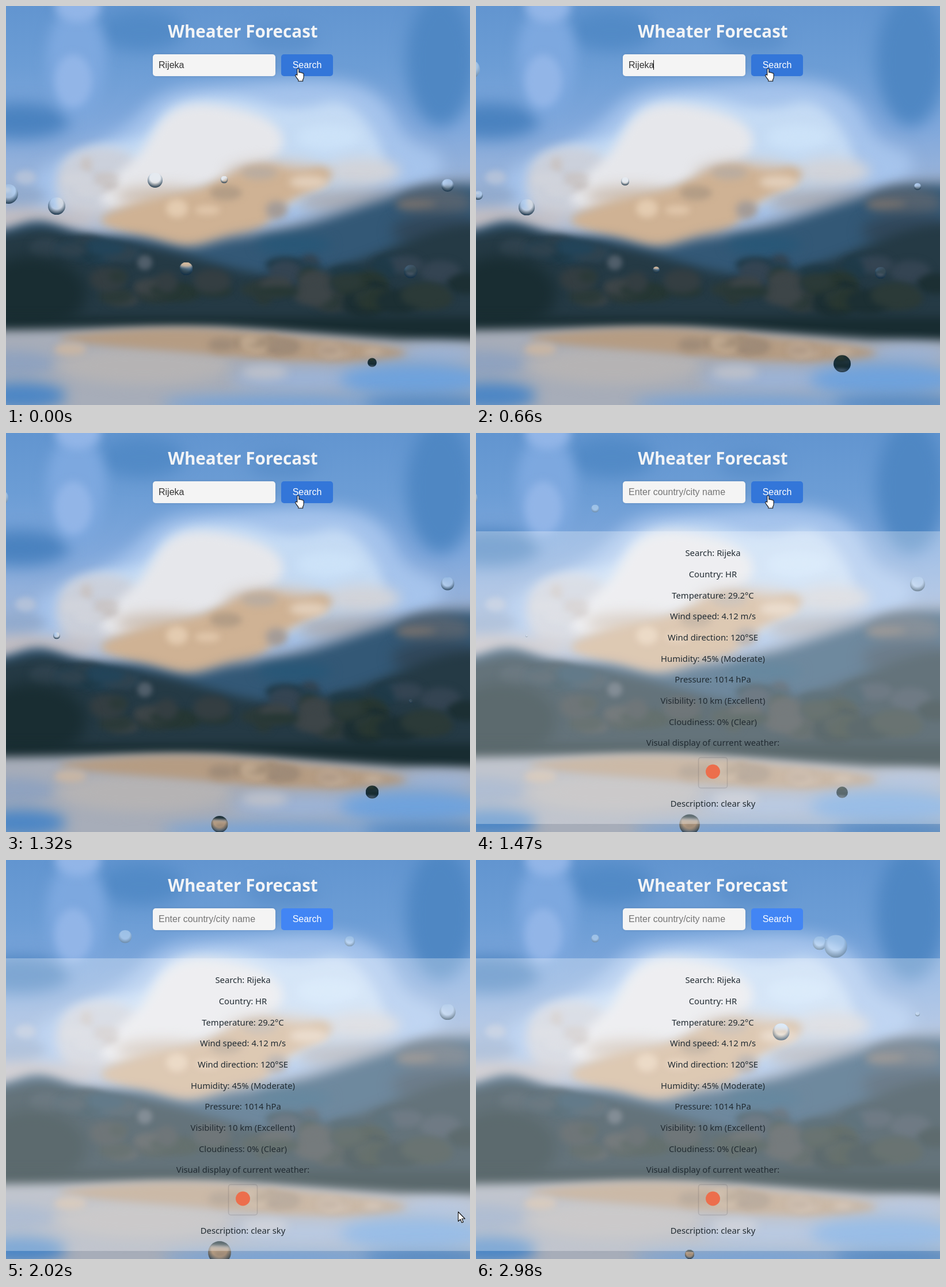
Animation of 806x694 px, one loop 3000 ms. Source, as an HTML page with a canvas:

```html
<!DOCTYPE html>
<html lang="en">
<head>
<meta charset="utf-8">
<title>Forecast</title>
<style>
  html, body { margin: 0; width: 100%; height: 100%; overflow: hidden; background: #6b9cd4; }
  canvas { display: block; width: 100vw; height: 100vh; }
</style>
</head>
<body>
<canvas id="stage" width="806" height="694"></canvas>
<script>
const W = 806, H = 694, LOOP = 3000;
const TICK = LOOP / 22, TICK_SHIFT = 44;
const RESULT_AT = 1470, LEAVE_AT = 1720, GONE_AT = 2170;
const SANS = '"Noto Sans", "Open Sans", sans-serif';
const FORM = '"Liberation Sans", Arial, sans-serif';
const ctx = document.getElementById('stage').getContext('2d');

const clamp = (v, lo, hi) => Math.min(hi, Math.max(lo, v));
const bump = (x, center, width) => Math.exp(-(((x - center) / width) ** 2));
const smooth = (x, from, to) => {
  const k = clamp((x - from) / (to - from), 0, 1);
  return k * k * (3 - 2 * k);
};

// ---------- blurred landscape, painted once ----------
const scene = document.createElement('canvas');
scene.width = W;
scene.height = H;
const bg = scene.getContext('2d');

function brush(color, blur) {
  bg.filter = `blur(${blur}px)`;
  bg.fillStyle = color;
  bg.beginPath();
}

function spot(color, blur, x, y, rx, ry) {
  brush(color, blur);
  bg.ellipse(x, y, rx, ry, 0, 0, 7);
  bg.fill();
}

// Smooth closed shape through the midpoints of its corners.
function blob(color, blur, ...pts) {
  const n = pts.length;
  brush(color, blur);
  for (let i = 0; i <= n; i++) {
    const [ax, ay] = pts[i % n], [bx, by] = pts[(i + 1) % n];
    bg.quadraticCurveTo(ax, ay, (ax + bx) / 2, (ay + by) / 2);
    if (i === 0) {
      bg.beginPath();
      bg.moveTo((ax + bx) / 2, (ay + by) / 2);
    }
  }
  bg.fill();
}

// Everything below a ridge line y = ridge(x).
function ground(color, blur, ridge) {
  brush(color, blur);
  bg.moveTo(-60, H + 60);
  for (let x = -60; x <= W + 60; x += 10) bg.lineTo(x, ridge(x));
  bg.lineTo(W + 60, H + 60);
  bg.fill();
}

let seed = 7;
function random(lo, hi) {
  seed = (seed * 16807) % 2147483647;
  return lo + (hi - lo) * seed / 2147483647;
}

// Soft seeded patches inside a box.
function mottle(colors, count, left, top, right, bottom, size) {
  for (let i = 0; i < count; i++) {
    const rx = random(.6, 1.6) * size, ry = random(.4, .9) * size;
    spot(colors[i % colors.length], 6, random(left, right), random(top, bottom), rx, ry);
  }
}

const farRidge = x => 396 - 25 * bump(x, 55, 55) + 20 * bump(x, 315, 60) - 90 * smooth(x, 400, 800);
const nearRidge = x => 403 - 18 * bump(x, 60, 60) + 65 * bump(x, 480, 190) - 25 * smooth(x, 600, 800);
const shore = x => 564 - 6 * bump(x, 300, 200) + 18 * smooth(x, 350, 800);

function paintSky() {
  const g = bg.createLinearGradient(0, 0, 0, 420);
  ['#6295d0', '#6c9dd5', '#80a8dc', '#9db5d9', '#b8b9c4'].forEach((c, i) => g.addColorStop(i / 4, c));
  bg.fillStyle = g;
  bg.fillRect(0, 0, W, H);

  spot('#4a82bf', 14, 25, 200, 85, 32);
  spot('#4f87c3', 14, 755, 95, 60, 115);
  spot('#528ac6', 14, 235, 42, 75, 36);
  spot('#5c90cb', 12, 480, 55, 60, 25);
  spot('#7da8df', 11, 122, 95, 52, 95);
  spot('#92b5e7', 7, 117, 130, 32, 46);
  spot('#92b5e7', 8, 125, 0, 40, 28);

  blob('#a6c4ec', 14, [30, 290], [200, 225], [270, 145], [390, 135], [590, 125], [665, 165],
    [690, 235], [770, 260], [740, 320], [600, 390], [60, 395]);
  spot('#92abce', 10, 20, 330, 50, 20);
  spot('#b2c1d9', 5, 34, 298, 18, 12);
  blob('#c5dbf4', 10, [285, 165], [400, 155], [500, 185], [600, 155], [680, 290], [560, 350],
    [200, 350], [95, 300], [140, 245], [240, 235]);
  blob('#cbd0db', 9, [100, 255], [180, 240], [240, 270], [230, 350], [120, 380], [80, 320]);
  blob('#e6e7eb', 9, [275, 185], [340, 165], [470, 195], [490, 260], [360, 310], [190, 365],
    [150, 325], [235, 260]);
  spot('#cce2f8', 9, 560, 228, 55, 22);
  spot('#d1d3d9', 11, 620, 288, 65, 24);
  spot('#c6bfc0', 13, 60, 372, 110, 18);
  spot('#aaaeb8', 13, 600, 340, 95, 24);
  mottle(['#c9c4c4', '#d0d3db'], 6, 115, 260, 200, 340, 17);
}

function paintMountain() {
  spot('#d0c6bf', 11, 470, 292, 90, 25);
  spot('#cfc3b9', 11, 270, 330, 80, 18);
  blob('#cfb294', 8, [140, 372], [240, 335], [320, 325], [380, 295], [450, 272], [510, 290],
    [555, 275], [575, 300], [480, 345], [445, 395], [315, 440], [230, 405]);
  spot('#e3cbb0', 6, 297, 352, 19, 16);
  spot('#e0c6aa', 6, 350, 355, 22, 8);
  spot('#e2cfbb', 7, 525, 306, 33, 11);
  spot('#b39d86', 6, 382, 325, 28, 13);
  spot('#b9aca0', 7, 440, 290, 32, 11);
  spot('#a39b97', 7, 470, 355, 19, 16);
}

function paintHills() {
  ground('rgba(126,143,165,.7)', 9, x => farRidge(x) - 9 * smooth(x, 320, 480));
  ground('#335876', 9, x => farRidge(x) + 6);
  spot('#566370', 10, 745, 342, 65, 26);
  spot('#77726f', 7, 712, 345, 35, 7);
  spot('#31475a', 12, 755, 392, 85, 30);
  spot('#285777', 10, 500, 415, 65, 16);

  ground('#253a45', 9, nearRidge);
  mottle(['#234459', '#30434f', '#1f3a48'], 14, 60, 415, 220, 440, 22);
  mottle(['#234459', '#344452', '#1f3a48'], 12, 480, 445, 790, 465, 24);
  mottle(['#343e42', '#2b3a39', '#3d4548', '#263734'], 22, 160, 470, 570, 515, 24);
  mottle(['#283731', '#1c2f33', '#2b3a38'], 12, 590, 480, 800, 520, 28);
  spot('#192d32', 13, 45, 500, 95, 65);
  spot('#505e6a', 4, 241, 446, 13, 13);
  ground('#182c31', 8, x => 541);
}

function paintLake() {
  ground('#a7adb9', 8, shore);
  spot('#8fa2bf', 10, 15, 622, 70, 22);
  spot('#b5b3b4', 11, 240, 625, 150, 34);
  blob('#b59c83', 7, [60, 575], [300, 556], [480, 572], [650, 588], [715, 605], [640, 622],
    [470, 618], [330, 603], [150, 590]);
  mottle(['#a28d77', '#bfa88f', '#9f8b78'], 12, 310, 578, 500, 595, 15);
  mottle(['#c7b39f', '#b09a86'], 5, 540, 598, 660, 604, 13);
  spot('#c7b5a4', 6, 112, 597, 28, 11);
  spot('#9bb3d7', 12, 755, 605, 65, 14);
  spot('#9bb3d7', 12, 520, 650, 130, 18);
  spot('#6fa2dc', 13, 710, 650, 130, 30);
  spot('#74a2d8', 12, 480, 692, 210, 15);
  spot('#bcc0ca', 8, 450, 637, 40, 12);
  spot('#4c86c5', 12, 25, 678, 80, 24);
  spot('#4c86c5', 12, 740, 692, 120, 14);
}

paintSky();
paintMountain();
paintHills();
paintLake();

// ---------- drops: x, y at loop start, full radius, birth ----------
const LIFE = 2000, FADE = 1000, GROW = 150, FALL = 0.0034;
const DROPS = [
  [379, 302, 13, -1750], [4, 327, 18.8, -1180], [313, 457, 12.4, -1140], [259, 303, 13.5, -1070],
  [767, 312, 11.3, -1060], [703, 462, 12, -610], [88, 348, 15.5, -530], [636, 620, 15, -110],
  [-10, 108, 17, 0], [767, 257.5, 14, 1050], [371, 676, 20, 1125], [207, 126.5, 11.5, 1320],
  [597, 134.5, 13, 1820], [625, 140, 20, 2232], [530, 289, 15, 2355]
];

function dropAt([x, y, size, birth], t) {
  const age = t - birth;
  const grow = Math.max(0, 1 - Math.exp(-age / GROW));
  const fade = Math.sqrt(clamp((LIFE - age) / FADE, 0, 1));
  return { x, y: y + t * FALL, r: size * grow * fade };
}

function drawDrop({ x, y, r }) {
  if (r < 0.8) return;
  ctx.save();
  ctx.beginPath();
  ctx.arc(x, y, r, 0, 7);
  ctx.clip();
  // The lens squeezes a wider patch of landscape, shifted up towards the bottom of the stage.
  const span = 84;
  const sx = clamp(x - span / 2, 0, W - span);
  const sy = clamp(y - 75 * (y / 620) ** 3 - span / 2, 0, H - span);
  ctx.drawImage(scene, sx, sy, span, span, x - r, y - r, 2 * r, 2 * r);
  ctx.fillStyle = `rgba(225,243,255,${clamp(.55 - y / 1000, 0, .45)})`;
  ctx.fillRect(x - r, y - r, 2 * r, 2 * r);
  const rim = ctx.createRadialGradient(x, y - r * .35, r * .7, x, y - r * .35, r * 1.35);
  rim.addColorStop(0, 'rgba(12,42,66,0)');
  rim.addColorStop(1, `rgba(12,42,66,${clamp(y / 350, .4, .9)})`);
  ctx.fillStyle = rim;
  ctx.fillRect(x - r, y - r, 2 * r, 2 * r);
  ctx.restore();
}

// Liquid neck between two touching drops.
function drawNeck(a, b) {
  if (a.r < 3 || b.r < 3) return;
  const mx = a.x + a.r * .85, my = (a.y + b.y) / 2, h = a.r * .4;
  ctx.fillStyle = '#9cc8f0';
  ctx.beginPath();
  ctx.moveTo(a.x + 3, a.y - a.r * .95);
  ctx.quadraticCurveTo(mx, my - h, b.x - 3, b.y - b.r * .95);
  ctx.lineTo(b.x - 3, b.y + b.r * .95);
  ctx.quadraticCurveTo(mx, my + h, a.x + 3, a.y + a.r * .95);
  ctx.fill();
}

function drawDrops(t) {
  const drops = DROPS.map(d => dropAt(d, t));
  const [left, right] = drops.slice(-3);
  drawNeck(left, right);
  drops.forEach(drawDrop);
}

// ---------- interface ----------
function text(str, x, y, font, color, align = 'left') {
  ctx.font = font;
  ctx.fillStyle = color;
  ctx.textAlign = align;
  ctx.fillText(str, x, y);
}

function box(x, y, w, h, color, shadow = 0) {
  ctx.save();
  ctx.shadowColor = 'rgba(0,0,0,.1)';
  ctx.shadowBlur = shadow;
  ctx.fillStyle = color;
  ctx.beginPath();
  ctx.roundRect(x, y, w, h, 5);
  ctx.fill();
  ctx.restore();
}

const LINES = ['Search: Rijeka', 'Country: HR', 'Temperature: 29.2°C', 'Wind speed: 4.12 m/s',
  'Wind direction: 120°SE', 'Humidity: 45% (Moderate)', 'Pressure: 1014 hPa',
  'Visibility: 10 km (Excellent)', 'Cloudiness: 0% (Clear)', 'Visual display of current weather:'];

function drawResult() {
  const line = (str, y) => text(str, 411.5, y, '14.8px ' + SANS, '#212b32', 'center');
  ctx.fillStyle = 'rgba(255,255,255,.29)';
  ctx.fillRect(0, 171, W, 509);
  LINES.forEach((str, i) => line(str, 214.3 + i * 36.65));
  line('Description: clear sky', 650.3);

  ctx.strokeStyle = 'rgba(30,30,40,.13)';
  ctx.lineWidth = 1.5;
  ctx.beginPath();
  ctx.roundRect(386.5, 564.5, 50, 53, 4);
  ctx.stroke();
  ctx.fillStyle = '#ec6e4c';
  ctx.beginPath();
  ctx.arc(411.5, 589, 12.5, 0, 7);
  ctx.fill();
}

function drawForm(t) {
  const font = '16px ' + FORM;
  text('Wheater Forecast', 411.5, 55, 'bold 29.6px ' + SANS, '#f3f4f6', 'center');
  box(255, 84, 213, 38, '#f4f4f4', 5);
  box(478, 84, 90, 38, t < LEAVE_AT ? '#3376d9' : '#4285f4');
  if (t < RESULT_AT) text('Rijeka', 265, 108, font, '#333');
  else text('Enter country/city name', 265, 108, font, '#757575');
  text('Search', 523, 108, font, '#fff', 'center');
  if (t >= 510 && t < 1050) {
    ctx.fillStyle = '#111';
    ctx.fillRect(308, 94, 1, 17);
  }
}

const ARROW = new Path2D('M0 0V16.5L3.8 13L6.3 18.8L8.9 17.7L6.4 12H11.7Z');
const HAND = new Path2D('M3.5 12.5V2.5Q3.5 .7 5 .7Q6.6 .7 6.6 2.5V7.5Q8.2 6.4 9.4 8Q11 7.2 12 8.8' +
  'Q14.8 8.2 14.8 11V16Q14.8 18.5 13.3 20V22.7H5.5V20.5Q3 18 .8 14Q-.2 12 1.3 11.5Q2.5 11.3 3.5 12.5Z');

function drawCursor(t) {
  if (t >= GONE_AT) return;
  const shape = t < LEAVE_AT ? HAND : ARROW;
  const k = clamp((t - LEAVE_AT) / 300, 0, 1);
  ctx.save();
  ctx.translate(502.3 + 283.2 * k, 108 + 504 * k);
  ctx.fillStyle = '#fff';
  ctx.strokeStyle = '#111';
  ctx.lineWidth = 1.1;
  ctx.lineJoin = 'round';
  ctx.fill(shape);
  ctx.stroke(shape);
  ctx.restore();
}

function draw(now) {
  const time = now % LOOP;
  const t = Math.max(0, Math.floor((time + TICK_SHIFT) / TICK) * TICK - TICK_SHIFT);
  ctx.drawImage(scene, 0, 0);
  drawDrops(t);
  if (time >= RESULT_AT) drawResult();
  drawForm(time);
  drawCursor(time);
}

const start = performance.now();
function loop() {
  draw(performance.now() - start);
  requestAnimationFrame(loop);
}
loop();
</script>
</body>
</html>
```
